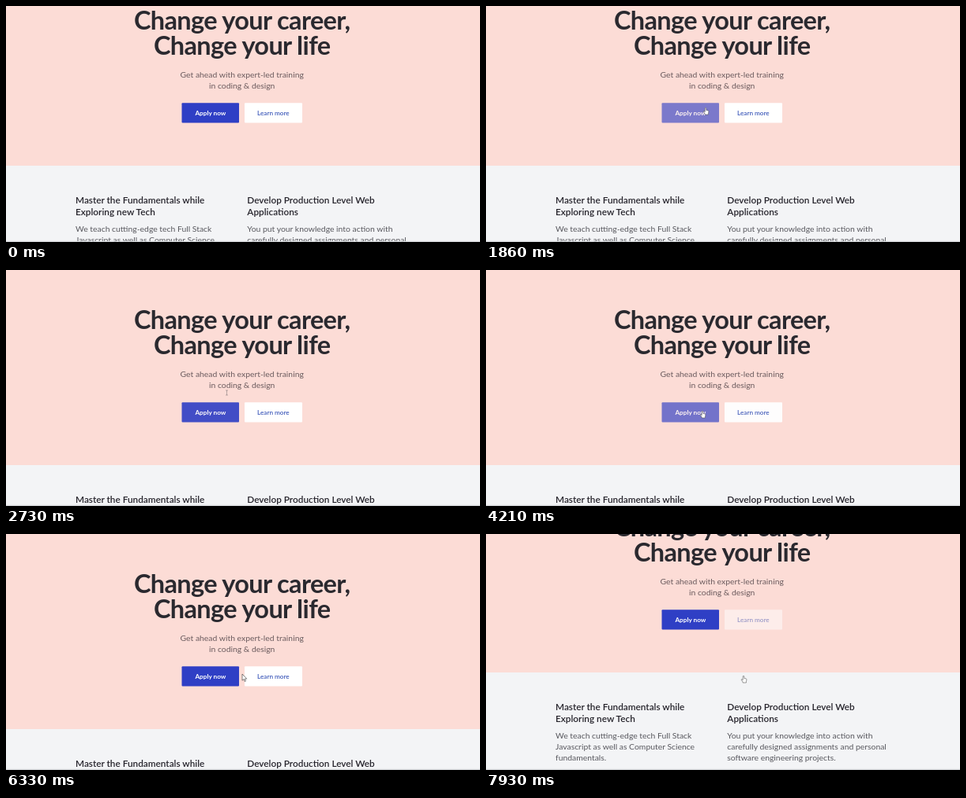
Animation, 600 px wide and 300 px high, one loop 8 s. Source, as an HTML page:

```html
<!DOCTYPE html>
<html lang="en">
<head>
<meta charset="utf-8">
<title>Course landing page</title>
<style>
  html, body { margin: 0; width: 100%; height: 100%; overflow: hidden; background: #f3f4f6; }
  svg { display: block; width: 100%; height: 100%; font-family: Lato, "Open Sans", sans-serif; }
  .mid { text-anchor: middle; }
  .title { font-size: 32.5px; font-weight: 700; letter-spacing: -.65px; fill: #2a292f; }
  .copy { font-size: 10.4px; fill: #58585e; }
  .lead { fill: #6b5b5e; }
  .head { font-size: 11.8px; font-weight: 600; fill: #25232b; }
  .btn { font-size: 8.2px; font-weight: 700; fill: #fff; }
  .alt { font-weight: 500; fill: #2d4bb4; }
  .cursor path { stroke-linejoin: round; }
</style>
</head>
<body>
<svg viewBox="0 0 600 300">
  <g id="page">
    <rect y="-100" width="600" height="303" fill="#fcdcd6"/>
    <rect y="203" width="600" height="220" fill="#f3f4f6"/>
    <g class="title mid">
      <text x="298.7" y="29.6">Change your career,</text>
      <text x="298.7" y="61.8">Change your life</text>
    </g>
    <g class="copy lead mid">
      <text x="298.7" y="91">Get ahead with expert-led training</text>
      <text x="298.7" y="105">in coding &amp; design</text>
    </g>
    <g id="apply">
      <rect x="222.5" y="123.2" width="72.5" height="25.2" rx="1" fill="#2f3fc5"/>
      <text class="btn mid" x="258.9" y="138.6">Apply now</text>
    </g>
    <g id="learn">
      <rect x="302" y="123.2" width="73" height="25.2" rx="1" fill="#fff"/>
      <text class="btn alt mid" x="338.4" y="138.6">Learn more</text>
    </g>
    <g class="head">
      <text x="88" y="250.7">Master the Fundamentals while</text>
      <text x="88" y="266.2">Exploring new Tech</text>
      <text x="305.3" y="250.7">Develop Production Level Web</text>
      <text x="305.3" y="266.2">Applications</text>
    </g>
    <g class="copy">
      <text x="88" y="287">We teach cutting-edge tech Full Stack</text>
      <text x="88" y="300.8">Javascript as well as Computer Science</text>
      <text x="88" y="314.5">fundamentals.</text>
      <text x="305.3" y="287">You put your knowledge into action with</text>
      <text x="305.3" y="300.8">carefully designed assignments and personal</text>
      <text x="305.3" y="314.5">software engineering projects.</text>
    </g>
  </g>
  <rect y="298.8" width="600" height="1.2" fill="#cdd0d3"/>
  <g id="cursor" class="cursor">
    <path id="arrow" d="M0 0V8.2L1.9 6.5L3.2 9.5L4.5 8.9L3.2 6.1H5.8Z" fill="#fff" stroke="#333" stroke-width=".6"/>
    <path id="hand" d="M-.8 .8Q0-.6 .8 .8V3.4L3.1 3.9Q4 4.2 3.9 5.2L3.4 7.4V9H-.9V8L-2.7 5.5Q-3 4.4-1.9 4.7L-.8 5.7Z" fill="#fff" stroke="#555" stroke-width=".6"/>
    <path id="beam" d="M-1.5-3H1.5M0-3V3M-1.5 3H1.5" fill="none" stroke="#8b7e80" stroke-width=".6"/>
  </g>
</svg>
<script>
  const LOOP = 8000;
  const el = id => document.getElementById(id);

  // Keys are [time, values...], linear in between.
  const scroll = [[2400, 0], [2460, 9], [2590, 41], [2680, 45],
                  [7640, 45], [7810, 42.5], [7865, 17], [7930, -27]];

  // [time, x, y, shape from this time on]
  const pointer = [
    [100, 583, 276, "arrow"], [370, 347, 166, "arrow"],
    [700, 347, 166, "arrow"], [850, 334, 165, "arrow"],
    [1380, 334, 165, "arrow"], [1560, 278, 129, "hand"],
    [2400, 278, 129, "hand"], [2620, 279.5, 156, "beam"],
    [2750, 279.5, 156, "arrow"], [2880, 338, 178, "hand"],
    [3790, 338, 178, "hand"], [3930, 274, 179, "hand"],
    [4550, 274, 179, "hand"], [4670, 338, 179, "hand"],
    [4950, 338, 179, "hand"], [5080, 274, 179, "hand"],
    [5840, 274, 179, "hand"], [5970, 299, 178, "arrow"],
    [6990, 299, 178, "arrow"], [7080, 326, 180, "hand"]
  ];

  // Hover fades: [enter start, enter end, leave start, leave end]
  const hovers = {
    apply: [[1540, 1970, 2430, 2800], [3930, 4350, 4600, 5000], [5080, 5500, 5880, 6330]],
    learn: [[2880, 3200, 3810, 4250], [4670, 4950, 5010, 5310], [7050, 7330, 8000, 8400]]
  };

  const clamp = v => Math.min(1, Math.max(0, v));
  const ramp = (t, a, b) => clamp((t - a) / (b - a));

  function at(keys, t, col = 1) {
    const i = keys.findIndex(k => k[0] > t);
    if (i === 0) return keys[0][col];
    if (i < 0) return keys[keys.length - 1][col];
    const a = keys[i - 1], b = keys[i];
    return a[col] + (b[col] - a[col]) * ramp(t, a[0], b[0]);
  }

  function draw(t) {
    el("page").setAttribute("transform", `translate(0 ${at(scroll, t)})`);

    for (const id in hovers) {
      const fade = hovers[id].reduce((sum, [a, b, c, d]) => sum + ramp(t, a, b) - ramp(t, c, d), 0);
      el(id).setAttribute("opacity", 1 - .5 * fade);
    }

    const key = pointer.filter(k => k[0] <= t).pop();
    el("cursor").setAttribute("transform", `translate(${at(pointer, t, 1)} ${at(pointer, t, 2)})`);
    for (const shape of ["arrow", "hand", "beam"])
      el(shape).style.display = key && key[3] === shape ? "" : "none";
  }

  const start = performance.now();
  function tick() {
    draw((performance.now() - start) % LOOP);
    requestAnimationFrame(tick);
  }
  tick();
</script>
</body>
</html>
```
